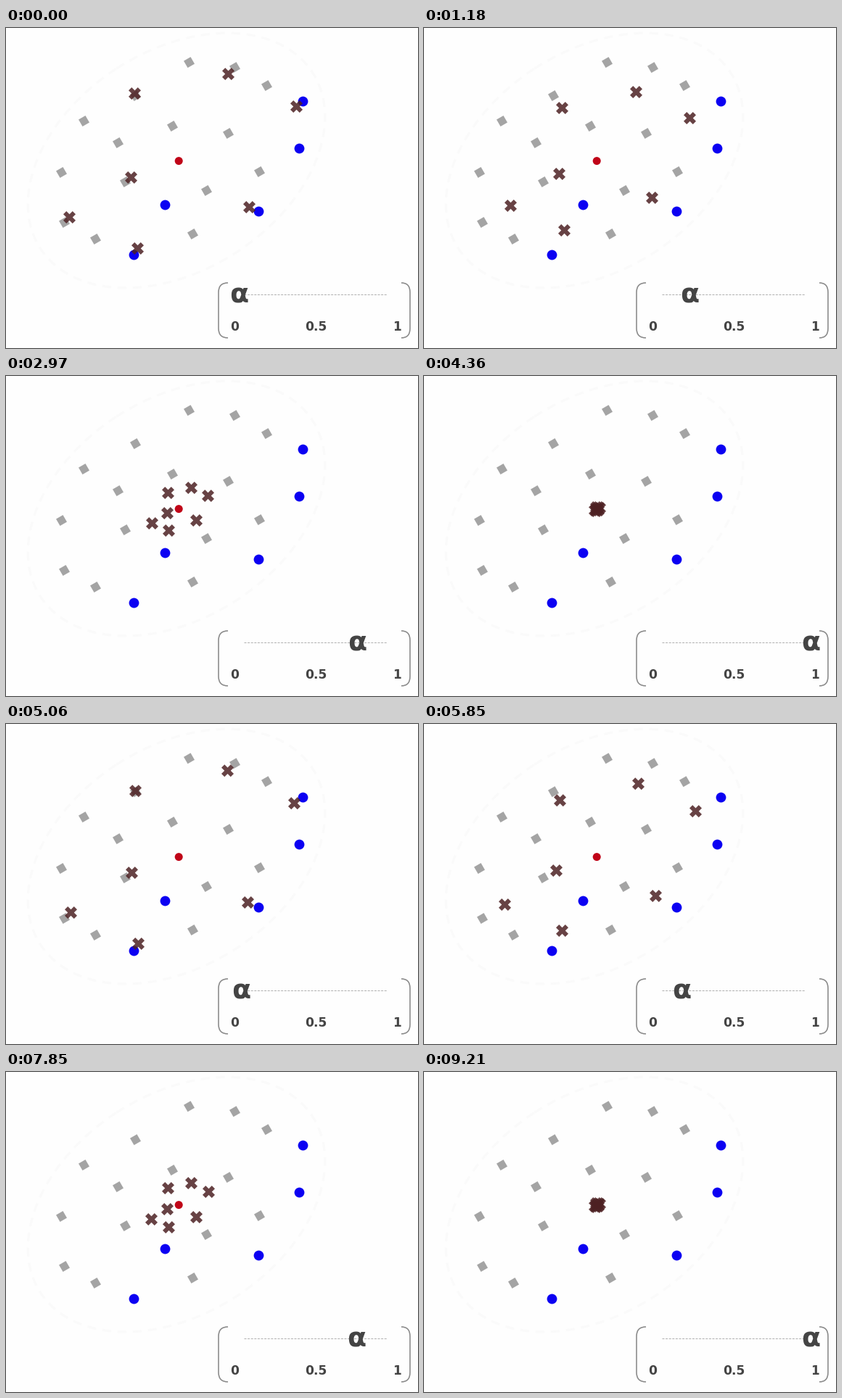
Write a matplotlib script that moves like this. It is 568x442 px and loops after 9240 ms.

```python
import matplotlib.pyplot as plt
import numpy as np
from matplotlib.animation import FuncAnimation
from matplotlib.patches import Circle, Ellipse, PathPatch
from matplotlib.path import Path

W, H, DPI = 568, 442, 64
PX = 72 / DPI              # points per pixel
FRAMES, STEP = 308, 30     # 9240 ms loop
PERIOD, LEAD = 4875, 362   # sweep length and phase at t = 0, in ms

# Scattered data points
SQUARES = [(252, 47), (315, 54), (359, 79), (178, 93), (107, 128),
           (229, 135), (306, 145), (154, 158), (76, 199), (349, 198),
           (164, 212), (276, 224), (80, 268), (257, 284), (123, 291)]
DOTS = [(409, 101), (404, 166), (348, 253), (219, 244), (176, 313)]
CROSSES = [(176, 89), (307, 61), (402, 107), (171, 206),
           (85, 262), (180, 306), (336, 248)]

CENTER = np.array([238.2, 183.6])
SHRINK = 0.02              # spread of the crosses left after a sweep
ALPHA_FROM, ALPHA_TO = 318, 533.5
DARK = "#444444"

fig = plt.figure(figsize=(W / DPI, H / DPI), dpi=DPI, facecolor="#fefefe")
ax = fig.add_axes([0, 0, 1, 1])
ax.set(xlim=(0, W), ylim=(H, 0))
ax.axis("off")


def markers(points, shape, size, color, **kw):
    x, y = zip(*points)
    return ax.scatter(x, y, marker=shape, s=(size * PX) ** 2, c=color,
                      linewidths=0, **kw)


def label(x, y, text, size):
    return ax.text(x, y, text, size=size * PX, color=DARK, weight="bold",
                   family="DejaVu Sans", ha="center", va="baseline", zorder=6)


def bracket(tip, side, top=352, bottom=428, r=13):
    verts = [(tip, top), (side, top), (side, top + r),
             (side, bottom - r), (side, bottom), (tip, bottom)]
    codes = [Path.MOVETO, Path.CURVE3, Path.CURVE3,
             Path.LINETO, Path.CURVE3, Path.CURVE3]
    ax.add_patch(PathPatch(Path(verts, codes), fill=False, ec="#8a8a8a",
                           lw=1.6 * PX))


ax.add_patch(Ellipse((235, 183), 447, 303, angle=-33, fill=False,
                     ec="#fafafa", lw=3 * PX, ls=(0, (4, 3))))
markers(SQUARES, (4, 0, -15), 15.5, "#a4a4a4", zorder=2)
markers(DOTS, "o", 13.8, "#0c00f2", zorder=3)
ax.add_patch(Circle(CENTER, 5.5, fc="#c00418", lw=0, zorder=3))
crosses = markers(CROSSES, "X", 17, "#4d2123", alpha=0.85, zorder=4)

bracket(306, 293)
bracket(545, 557)
ax.plot([328, 525], [368, 368], color="#b0b0b0", lw=PX,
        ls=(0, (3, 1.6)), zorder=2)
for x, text in ((315, "0"), (427.5, "0.5"), (539, "1")):
    label(x, 417.5, text, 17)
alpha = label(ALPHA_FROM, 380, "α", 38)


def progress(t):
    phase = (t + LEAD) % PERIOD / PERIOD
    return (1 - np.cos(np.pi * phase)) / 2


def update(frame):
    s = progress(frame * STEP)
    spread = 1 - s * (1 - SHRINK)
    crosses.set_offsets(CENTER + spread * (np.array(CROSSES) - CENTER))
    alpha.set_x(ALPHA_FROM + s * (ALPHA_TO - ALPHA_FROM))
    return crosses, alpha


anim = FuncAnimation(fig, update, frames=FRAMES, interval=STEP,
                     repeat=True, repeat_delay=0)
plt.show()
```
